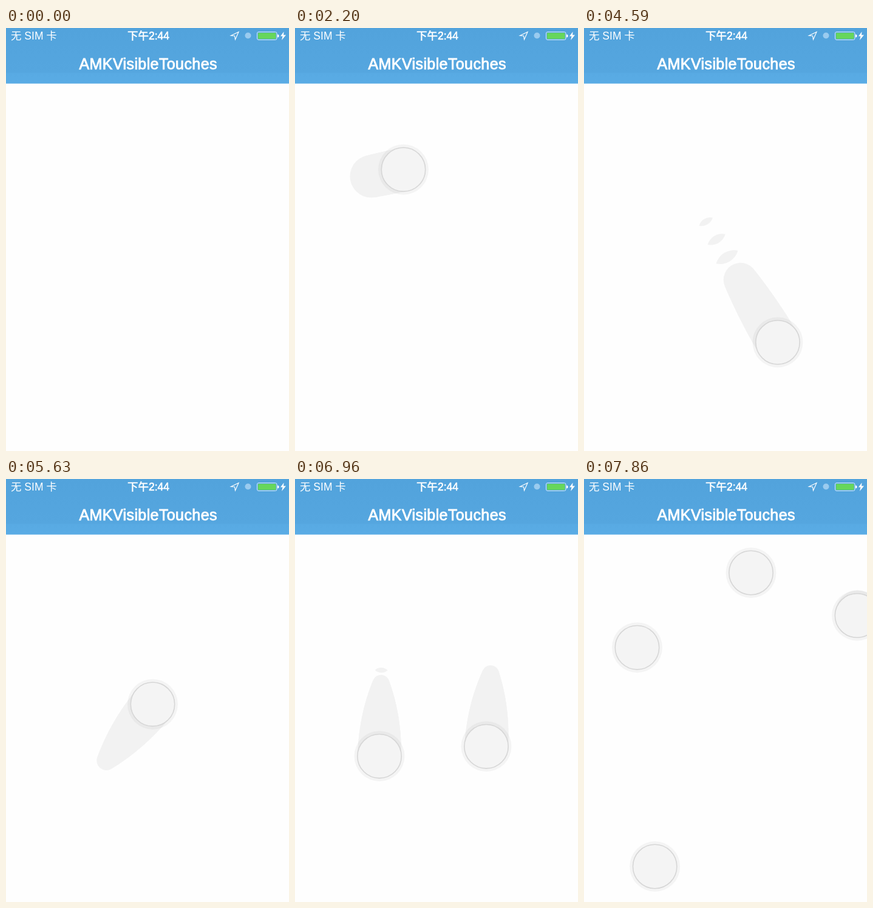
Write an HTML page that moves like this. It is 466 by 697 pixels and loops after 8000 ms.

```html
<!DOCTYPE html>
<html lang="zh-CN">
<head>
<meta charset="utf-8">
<style>
  html, body { margin: 0; width: 100%; height: 100%; overflow: hidden; background: #fefefe; }
  svg { display: block; width: 466px; height: 697px; }
  text { fill: #fff; font: 17.5px "Liberation Sans", "Noto Sans CJK SC", "Noto Sans CJK", sans-serif; }
  .time { stroke: #fff; stroke-width: .6; }
  .title { font-size: 25px; letter-spacing: .4px; stroke: #fff; stroke-width: .9; }
</style>
</head>
<body>
<svg viewBox="0 0 466 697">
  <defs>
    <linearGradient id="bar" x2="0" y2="1">
      <stop offset="0" stop-color="#52a3dc"/>
      <stop offset=".8" stop-color="#55a6df"/>
      <stop offset=".81" stop-color="#58aae3"/>
      <stop offset="1" stop-color="#5aace5"/>
    </linearGradient>
  </defs>
  <g id="touches"></g>
  <rect width="466" height="91.6" fill="url(#bar)"/>
  <text x="8" y="19">无 SIM 卡</text>
  <text class="time" x="234.5" y="19" text-anchor="middle">下午2:44</text>
  <text class="title" x="234.2" y="68" text-anchor="middle">AMKVisibleTouches</text>
  <path d="M370.5 12.5 383 6.5 377.5 19 376.5 13Z" fill="none" stroke="#fff" stroke-width="1.2"/>
  <circle cx="398.5" cy="12.5" r="5" fill="#9acbef"/>
  <rect x="413.5" y="6.5" width="32.5" height="13" rx="2.5" fill="none" stroke="#d5eafa"/>
  <rect x="415" y="8" width="29.5" height="10" rx="1" fill="#66d65c"/>
  <path d="M447 10.5a2.5 2.5 0 0 1 0 5Z" fill="#fff"/>
  <path d="M457.5 6 452 13.5h3.5L454 20l7-8.5h-4Z" fill="#fff"/>
</svg>
<script>
const LOOP = 8000, DISC = 36, REACH = 120;

const circle = (x, y, r, style = '') => `<circle cx="${x}" cy="${y}" r="${r}" ${style}/>`;

// Tail pointing back to the previous position; it narrows with the square of the distance.
function tail([x, y], [px, py], tip, lenses) {
  const distance = Math.hypot(px - x, py - y);
  const length = Math.min(distance, REACH);
  const ux = (px - x) / distance, uy = (py - y) / distance;
  const radius = d => DISC - (DISC - tip) * (d / REACH) ** 2;
  let shapes = '';
  for (let d = 0; d <= length; d += 3) shapes += circle(x + ux * d, y + uy * d, radius(d));

  // Leftover slivers beyond the end of a full-length tail
  for (let k = 0; k < lenses && length === REACH; k++) {
    const d = length + tip * 1.55 + 34 * k;
    const half = tip * .75 - 4 * k, arc = half * 1.45;
    const cx = x + ux * d, cy = y + uy * d;
    const a = `${cx - uy * half} ${cy + ux * half}`, b = `${cx + uy * half} ${cy - ux * half}`;
    shapes += `<path d="M${a}A${arc} ${arc} 0 0 1 ${b}A${arc} ${arc} 0 0 1 ${a}Z"/>`;
  }
  return `<g opacity=".043">${shapes}</g>`;
}

function touch(at, previous, tip, lenses) {
  const moved = at[0] !== previous[0] || at[1] !== previous[1];
  return (moved ? tail(at, previous, tip, lenses) : '') +
    circle(...at, 41.5, 'opacity=".04"') +
    circle(...at, DISC + .2, 'fill="#f4f4f4" stroke="#d6d6d6" stroke-width="1.6"');
}

// The first path point is the origin; the finger holds each later one until the next time.
const drag = (times, path, tip = 16, lenses = 0) => ({ times, path, tip, lenses });
const tap = (start, end, point) => drag([start, end], [point, point]);

const down = [6660, 6960, 7260, 7560];
const gestures = [
  tap(1320, 1610, [141.5, 214.5]),
  drag([2200, 2650], [[123, 245], [178.5, 233.2]], 32),
  drag([2650, 2950], [[324, 222.5], [329, 222]]),
  tap(3550, 4000, [157.8, 217.5]),
  drag([4290, 4590, 5040], [[112, 176], [130, 200], [319, 518]], 28, 3),
  drag([5330, 5630, 5920, 6220], [[105, 535], [125, 513], [241.5, 371.2], [343, 263]]),
  drag(down, [[143, 250], [143, 274], [139, 456.7], [150, 542]], 14, 1),
  drag(down, [[325, 247], [325, 271], [315, 440.7], [318, 530]], 14),
  drag([7860, LOOP], [[451, 217], [449.5, 225]]),
  ...[[87.5, 277.7], [275, 154.5], [116.7, 638.5]].map(point => tap(7860, LOOP, point))
];

function picture(t) {
  return gestures.map(({ times, path, tip, lenses }) => {
    const step = times.findLastIndex(time => time <= t);
    const active = step >= 0 && step < times.length - 1;
    return active ? touch(path[step + 1], path[step], tip, lenses) : '';
  }).join('');
}

const stage = document.getElementById('touches');
let shown;
function draw() {
  const next = picture(performance.now() % LOOP);
  if (next !== shown) stage.innerHTML = shown = next;
  requestAnimationFrame(draw);
}
draw();
</script>
</body>
</html>
```
